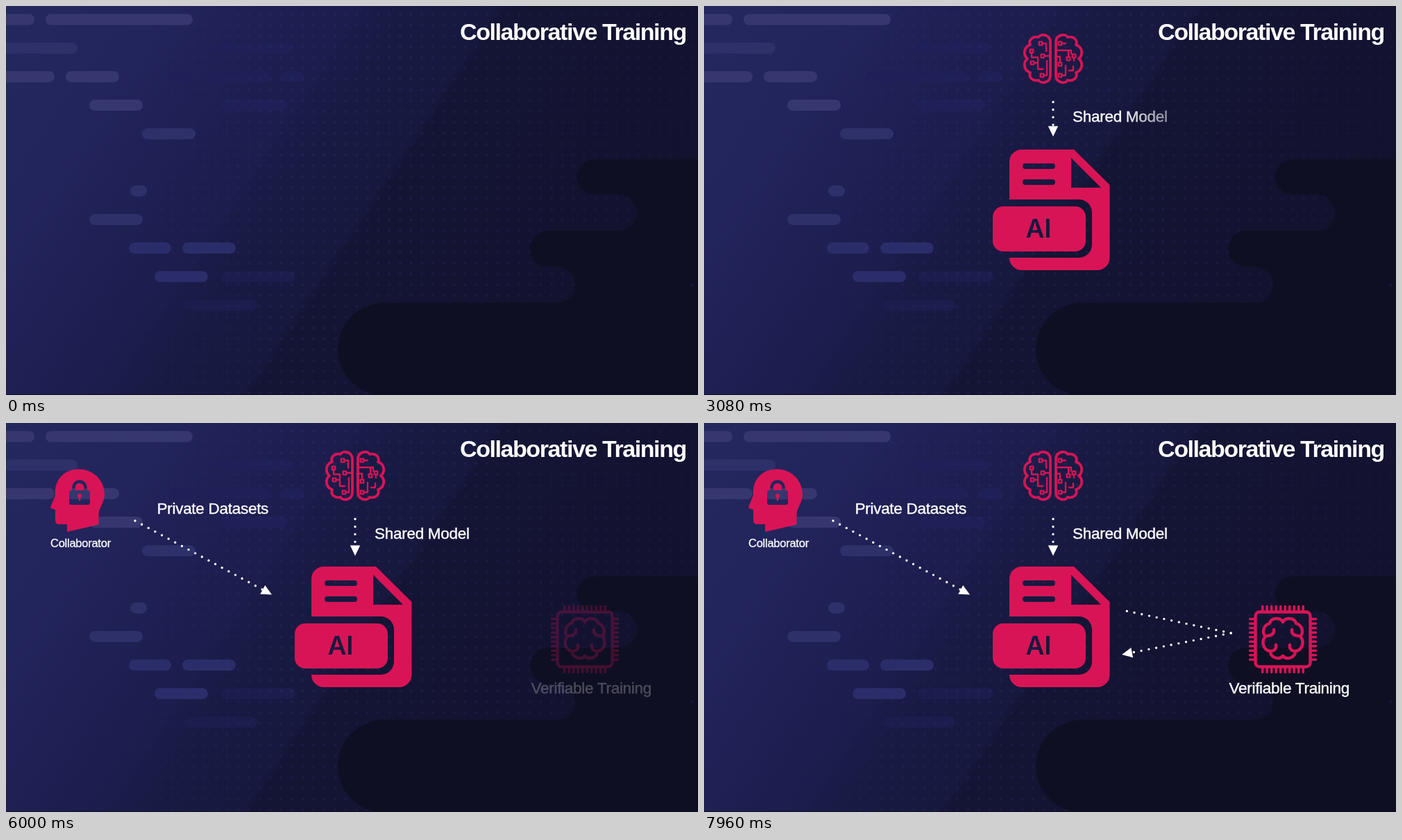
Animation of 997 by 561 pixels, one loop 8 s. Source, as an HTML page:

```html
<!DOCTYPE html>
<html lang="en">
<head>
<meta charset="utf-8">
<title>Collaborative Training</title>
<style>
html, body { margin: 0; width: 100%; height: 100%; overflow: hidden; background: #131330; }
svg { display: block; width: 100%; height: 100%; }
text { font-family: "Liberation Sans", Arial, sans-serif; fill: #fff; }
.label { font-size: 22.5px; letter-spacing: -.28px; stroke: #fff; stroke-width: .4px; }
.small { font-size: 16.5px; letter-spacing: -.25px; stroke: #fff; stroke-width: .3px; }
.title { font-size: 34px; font-weight: bold; letter-spacing: -1.42px; }
.solid { fill: #d81456; }
.line { fill: none; stroke: #d81456; stroke-linejoin: round; stroke-linecap: round; }
.dots line { stroke: #fff; stroke-width: 3.4; stroke-linecap: round; stroke-dasharray: 0 10.95; }
.dots path { fill: #fff; }
</style>
</head>
<body>
<svg viewBox="0 0 997 561">
  <defs>
    <linearGradient id="sky" gradientUnits="userSpaceOnUse" x1="0" y1="0" x2="835" y2="550">
      <stop offset="0" stop-color="#24285f"/>
      <stop offset=".2" stop-color="#22245b"/>
      <stop offset=".3" stop-color="#1f2054"/>
      <stop offset=".425" stop-color="#1c1d4c"/>
      <stop offset=".44" stop-color="#1a1b47"/>
      <stop offset=".59" stop-color="#17183d"/>
      <stop offset=".605" stop-color="#141434"/>
      <stop offset="1" stop-color="#12122e"/>
    </linearGradient>
    <pattern id="grid" width="15.600" height="15.600" patternUnits="userSpaceOnUse">
      <circle cx="6.200" cy="12" r="2.300" fill="#4448a8"/>
    </pattern>
    <linearGradient id="gridFade">
      <stop offset=".1" stop-color="#000"/>
      <stop offset=".4" stop-color="#fff"/>
      <stop offset=".65" stop-color="#fff"/>
      <stop offset="1" stop-color="#555"/>
    </linearGradient>
    <mask id="gridMask"><rect width="997" height="561" fill="url(#gridFade)"/></mask>
    <mask id="fileMask" maskUnits="userSpaceOnUse" x="400" y="200" width="200" height="190">
      <rect x="400" y="200" width="200" height="190" fill="#fff"/>
      <path d="M529 219L572 262H529Z"/>
      <path d="M463 231H502M463 254H502" stroke="#000" stroke-width="8" stroke-linecap="round"/>
      <path d="M400 279H540a19 19 0 0 1 19 19V344a19 19 0 0 1-19 19H400Z"/>
    </mask>
    <mask id="badgeMask" maskUnits="userSpaceOnUse" x="400" y="280" width="170" height="90">
      <rect x="400" y="280" width="170" height="90" fill="#fff"/>
      <text x="482" y="334" text-anchor="middle" style="font:600 37px Inter,sans-serif;fill:#000">AI</text>
    </mask>
    <mask id="headMask" maskUnits="userSpaceOnUse" x="60" y="60" width="90" height="100">
      <rect x="60" y="60" width="90" height="100" fill="#fff"/>
      <rect x="91" y="97" width="30" height="21" rx="3"/>
      <path d="M97.500 98V93a8.500 8.500 0 0 1 17 0V98" fill="none" stroke="#000" stroke-width="4.500"/>
      <path d="M106 106V112" stroke="#fff" stroke-width="2.500"/>
      <circle cx="106" cy="105" r="3" fill="#fff"/>
    </mask>
    <linearGradient id="wipe" gradientUnits="userSpaceOnUse" y1="0" y2="0">
      <stop offset="0" stop-color="#fff"/>
      <stop offset="1" stop-color="#000"/>
    </linearGradient>
    <mask id="wipeMask" maskUnits="userSpaceOnUse" x="520" y="140" width="160" height="40">
      <rect x="520" y="140" width="160" height="40" fill="url(#wipe)"/>
    </mask>
    <path id="lobes" d="M-4 52C-4 41-18 39-21 45C-30 43-36 50-33 56C-42 59-44 70-37 76C-44 82-42 93-33 96C-36 103-29 109-21 107C-18 113-4 111-4 100Z"/>
    <path id="cortex" d="M0-24C3-31 17-31 19-22C29-19 30-8 25-3C32 4 28 17 18 18C18 28 5 31 0 25M23-4C17-4 12-7 13-13M18 18C12 18 9 14 10 9"/>
  </defs>

  <rect width="997" height="561" fill="url(#sky)"/>
  <g id="bars"></g>
  <rect width="997" height="561" fill="url(#grid)" mask="url(#gridMask)" opacity=".13"/>
  <path fill="#0f0f23" d="M997 221H848a25.500 25.500 0 0 0 0 51H883a26 26 0 0 1 0 52H781a26 26 0 0 0 0 52H794a26 26 0 0 1 0 52H548a67 67 0 0 0-14 133H997Z"/>
  <circle cx="989" cy="402" r="2.300" fill="#16163a"/>
  <rect y="560" width="997" height="1" fill="#0f0f23"/>
  <text class="title" x="654" y="49">Collaborative Training</text>

  <g id="file" class="solid">
    <path mask="url(#fileMask)" d="M458 207H533L584.500 258V363a18 18 0 0 1-18 18H458a18 18 0 0 1-18-18V225a18 18 0 0 1 18-18Z"/>
    <rect mask="url(#badgeMask)" x="416" y="289" width="134" height="65" rx="15"/>
  </g>

  <g id="brain" class="line" stroke-width="3.800">
    <g transform="translate(503)">
      <use href="#lobes"/>
      <use href="#lobes" transform="scale(-1 1)"/>
    </g>
    <path stroke-width="2.300" d="M488 54H493V65M472 68V74H481V80M491 72H498M476 82H481V91H488M490 100H494V79M516 54H521M507 64H529V69M525 64V73M533 75V79M513 81V73H507M516 100H521V86M526 93H532V87"/>
    <g id="nodes" stroke-width="2.300"></g>
  </g>
  <text id="shared" class="label" x="531" y="166.500" mask="url(#wipeMask)">Shared Model</text>

  <g id="person">
    <path class="solid" mask="url(#headMask)" d="M88 157V146H77Q71 146 71 140V125L66 123.500Q63 122 65 119L71 104C69 82 84 66.500 105 66.500C126 66.500 142 83 142 103C142 115 134 121 133.500 132V146.500Z"/>
    <text class="small" x="64" y="179">Collaborator</text>
    <text class="label" x="217.500" y="131">Private Datasets</text>
  </g>

  <g id="chip">
    <g class="line" stroke-width="4.400">
      <rect x="794.500" y="272.500" width="79" height="79" rx="6"/>
      <g id="pins" stroke-width="3.500"></g>
      <g transform="translate(834 311)">
        <use href="#cortex"/>
        <use href="#cortex" transform="scale(-1 1)"/>
      </g>
    </g>
    <text class="label" x="756.500" y="390">Verifiable Training</text>
  </g>
  <g id="arrows" class="dots"></g>
</svg>
<script>
const LOOP = 8000, STEP = 40;
const $ = id => document.getElementById(id);
const clamp = v => Math.min(1, Math.max(0, v));
const phase = (t, start, length) => clamp((t - start) / length);
const easeOut = u => 1 - (1 - u) ** 1.3;
const easeInOut = u => u < .5 ? 4 * u ** 3 : 1 - (2 - 2 * u) ** 3 / 2;

function add(parent, name, attrs) {
  const el = document.createElementNS("http://www.w3.org/2000/svg", name);
  set(el, attrs);
  return parent.appendChild(el);
}
function set(el, attrs) {
  for (const key in attrs) el.setAttribute(key, attrs[key]);
}

// Row, left, right for each tone of background bar
const bars = {
  "#36376f": [[0, -20, 41], [0, 57, 269], [2, -20, 70], [2, 86, 163], [3, 120, 197]],
  "#2e3069": [[1, -20, 103], [4, 196, 273], [6, 179, 203], [7, 120, 197]],
  "#2b2d6a": [[8, 177, 238], [8, 254, 331], [9, 214, 291]],
  "#1f2057": [[1, 302, 411], [2, 235, 272], [2, 288, 380], [2, 396, 430], [3, 308, 405]],
  "#1c1d4d": [[9, 308, 417], [10, 257, 362]]
};
for (const fill in bars)
  for (const [row, x, end] of bars[fill])
    add($("bars"), "rect", { x, y: 11.5 + row * 41.2, width: end - x, height: 16, rx: 8, fill });

for (const [x, y] of [[485, 54], [472, 65], [488, 72], [473, 82], [487, 100], [513, 54], [525, 76], [533, 72], [513, 84], [513, 100]])
  add($("nodes"), "rect", { x: x - 2.3, y: y - 2.3, width: 4.6, height: 4.6 });

for (let i = 0; i < 10; i++) {
  const d = 6.5 * i, x = 804.7 + d, y = 282.7 + d;
  add($("pins"), "path", { d: `M${x} 264.5V271M${x} 353V359.500M786.500 ${y}H793M875 ${y}H881.500` });
}

function makeArrow(x1, y1, x2, y2, start, length, hasHead = true) {
  const g = add($("arrows"), "g", {});
  const line = add(g, "line", { x1, y1 });
  const head = hasHead && add(g, "path", { d: "M0 0L-15 -7.200V7.200Z" });
  const total = Math.hypot(x2 - x1, y2 - y1);
  const ux = (x2 - x1) / total, uy = (y2 - y1) / total;
  const angle = Math.atan2(uy, ux) * 180 / Math.PI;
  return t => {
    const p = easeInOut(phase(t, start, length)), reach = total * p;
    const body = Math.max(.01, reach - (hasHead ? 14 : 0));
    g.style.display = p > 0 ? "" : "none";
    set(line, { x2: x1 + ux * body, y2: y1 + uy * body });
    if (head) set(head, {
      transform: `translate(${x1 + ux * reach} ${y1 + uy * reach}) rotate(${angle}) scale(${Math.min(1, reach / 15)})`
    });
  };
}
const arrows = [
  makeArrow(503, 138.5, 503, 191.5, 2480, 800),
  makeArrow(186, 141, 383, 247.5, 5000, 840),
  makeArrow(609.3, 271.3, 759.5, 303, 6640, 600, false),
  makeArrow(759, 303, 602, 334, 7160, 800)
];
const fades = { file: 1080, brain: 1840, person: 4320, chip: 5880 };

function draw(t) {
  for (const id in fades) $(id).style.opacity = easeOut(phase(t, fades[id], 600));
  const edge = 528 + 288 * phase(t, 2480, 800);
  set($("wipe"), { x1: edge - 144, x2: edge });
  $("shared").style.display = t > 2480 ? "" : "none";
  const turn = -5 * Math.sin(2 * Math.PI * 4 * phase(t, 7000, 960));
  set($("chip"), { transform: `rotate(${turn} 843 328)` });
  arrows.forEach(arrow => arrow(t));
}
function tick() {
  draw(Math.floor(performance.now() % LOOP / STEP) * STEP);
  requestAnimationFrame(tick);
}
tick();
</script>
</body>
</html>
```
